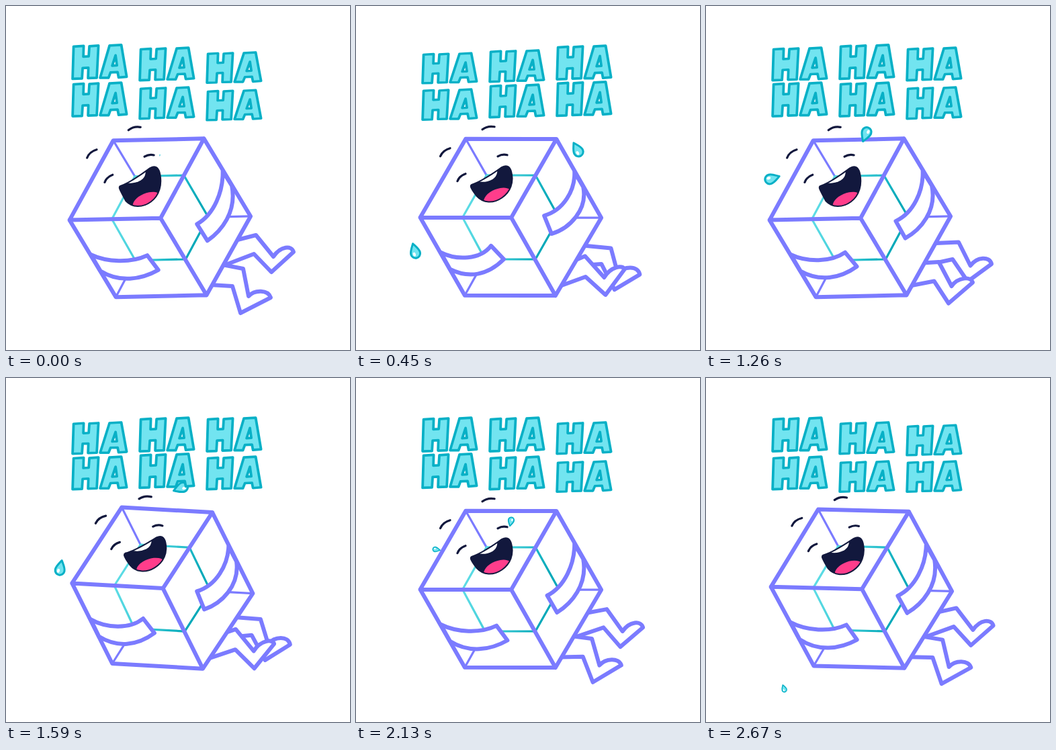
Write an HTML page that moves like this. It is 512 px wide and 512 px high and loops after 2.7 s.

```html
<!DOCTYPE html>
<html lang="en">
<head>
<meta charset="utf-8">
<title>Laughing cube</title>
<style>
  html, body { margin: 0; height: 100%; overflow: hidden; background: #fff; }
  svg { display: block; width: 100vw; height: 100vh; }
  path { stroke-linecap: round; stroke-linejoin: round; }
  .line { fill: none; stroke: #7b7bff; stroke-width: 6; }
  .limb { fill: #fff; stroke: #7b7bff; stroke-width: 6; }
  .thin { stroke-width: 3.2; }
  .ink { fill: none; stroke: #12183d; stroke-width: 3.2; }
  .core { fill: none; stroke: url(#teal); stroke-width: 3.2; }
  .water { fill: #72e4f0; stroke: #08b0c6; stroke-width: 3; }
  .letters { stroke-width: 3.8; }
</style>
</head>
<body>
<svg viewBox="0 0 512 512">
  <defs>
    <linearGradient id="teal" gradientUnits="userSpaceOnUse" x1="160" y1="300" x2="300" y2="330">
      <stop offset="0" stop-color="#5fdde6"/>
      <stop offset=".45" stop-color="#3ccbd6"/>
      <stop offset=".85" stop-color="#04a9b9"/>
    </linearGradient>
    <clipPath id="mouthClip"><path id="mouthEdge"/></clipPath>
    <path id="ha" class="water letters" fill-rule="evenodd" d="M101 60L116 59L115.500 75L123.500 74.500L124.500 59.500L138 58.500L135.500 106.500L122.500 107L123 91.500L114.500 92L113.500 107.500L99.500 108Z
      M154.500 58.500L172 57.500L180 105L168 106L166.500 98L156 98.500L153 106.500L140.500 106.500ZM158.500 88.500L165.500 88L163.500 73Z"/>
    <g id="drop">
      <path class="water" d="M0 -11C3 -6 7 -1 7 4A7 7 0 0 1 -7 4C-7 -1 -3 -6 0 -11Z"/>
      <ellipse cx="-2" cy="5" rx="2" ry="3" fill="#fff"/>
    </g>
  </defs>

  <path id="backLeg" class="limb"/>
  <path id="frontLeg" class="limb"/>
  <g id="body">
    <path fill="#fff" d="M163 198H298L365 315L297 431H162L95.500 315Z"/>
    <path class="line thin" d="M163 198L194 252M365 315H301M162 431L192 377"/>
    <path class="core" d="M194 252H267L302 315L267 377H192L158.500 315Z"/>
    <path class="line" d="M163 198H298L365 315L297 431H162L95.500 315ZM95.500 315H231L298 198M231 315L297 431"/>
    <path id="leftArm" class="limb"/>
    <path id="rightArm" class="limb"/>
    <path id="brows" class="ink" d="M151 261Q154 253 163 250M211 224Q218 220 225 222M125.500 224Q129 215 140 212M188 184Q196 178 206 180"/>
    <path id="mouth" fill="#12183d"/>
    <g clip-path="url(#mouthClip)">
      <path fill="#fff" d="M180 261L210 243Q211 253 203 258Q192 264 180 261Z"/>
      <ellipse id="tongue" rx="22" ry="12" fill="#ff3d8b"/>
    </g>
    <path id="lips" class="ink" style="stroke-width:2"/>
  </g>
  <use id="leftDrop" href="#drop"/>
  <use id="rightDrop" href="#drop"/>
  <g id="words" role="img" aria-label="HA HA HA HA HA HA"></g>
</svg>
<script>
const SVG = 'http://www.w3.org/2000/svg';
const STEP = 30, STEPS = 90, BEAT = 10, ROCK = 7;
const $ = id => document.getElementById(id);
const ease = u => (1 - Math.cos(Math.PI * u)) / 2;
const wave = k => ease(2 * k / BEAT);
const setPath = (id, d) => $(id).setAttribute('d', d);
const place = (el, transform) => el.setAttribute('transform', transform);

function make(tag, attrs) {
  const el = document.createElementNS(SVG, tag);
  for (const name in attrs) el.setAttribute(name, attrs[name]);
  return el;
}

// Each joint: x, y stretched out, then x, y pulled in.
const backLeg = [
  [333, 351, 330, 356], [372, 341, 380, 362], [398, 373, 389, 400],
  [409, 357, 398, 389], [425, 356, 419, 388], [428, 366, 422, 402],
  [395, 396, 384, 424], [369, 369, 365, 385], [322, 387, 322, 387]];
const frontLeg = [
  [322, 385, 322, 380], [353, 391, 340, 371], [361, 432, 370, 402],
  [370, 422, 380, 385], [390, 422, 398, 382], [394, 434, 400, 389],
  [349, 457, 373, 428], [337, 417, 342, 402], [304, 415, 298, 419]];

const flights = {
  leftDrop: make('path', { d: 'M127 257Q110 252 95 258C68 275 82 345 88 366S104 425 116 462' }),
  rightDrop: make('path', { d: 'M229 222Q231 207 239 188C252 150 295 150 329 213C340 233 357 262 368 284L381 314' })
};

const words = [];
for (let row = 0; row < 2; row++)
  for (let col = 0; col < 3; col++) {
    const el = $('words').appendChild(make('use', { href: '#ha' }));
    words.push({ el, x: col * 100 - .4, y: 108.4 + row * 55, lag: col * 2 + row });
  }

function drawLeg(id, joints, pull) {
  const p = joints.map(([x, y, x1, y1]) => `${x + (x1 - x) * pull} ${y + (y1 - y) * pull}`);
  setPath(id, `M${p[0]}L${p[1]}L${p[2]}C${p[3]} ${p[4]} ${p[5]}L${p[6]}L${p[7]}L${p[8]}`);
}

function drawArms(v) {
  setPath('leftArm', `M126 367C150 379 185 ${381 - 3 * v} ${210 - 9 * v} ${370 - 13 * v}
    L${226 - 6 * v} ${392 - 15 * v}C${200 - 4 * v} ${406 - 5 * v} 168 ${410 - 4 * v} 140 392Z`);
  setPath('rightArm', `M325 247C${325 + v} ${277 - 3 * v} ${311 - 2 * v} ${311 - 7 * v} ${285 - 5 * v} ${325 - 13 * v}
    L${300 - 9 * v} ${350 - 11 * v}C${321 - 3 * v} ${336 - 5 * v} 345 ${308 - 5 * v} 338 269Z`);
}

function drawFace(open) {
  const d = 5.5 * open;
  const shape = `M172 266C188 261 204 249 217 240C224 236 229 239 231 247
    C235 ${262 + d / 2} 230 ${276 + d} 217 ${285 + d}C204 ${294 + d} 189 ${293 + d} 180 ${283 + d}
    C176 ${278 + d / 2} 173 275 171 270Q170 267 172 266Z`;
  ['mouth', 'mouthEdge', 'lips'].forEach(id => setPath(id, shape));
  place($('tongue'), `translate(211 ${284 + d}) rotate(-22)`);
  place($('brows'), `translate(${-2 * open} ${-open})`);
}

function drawDrop(id, k, late) {
  const path = flights[id], length = path.getTotalLength();
  const at = length * ease(Math.min(1, k / 9));
  const a = path.getPointAtLength(Math.max(0, at - 1));
  const b = path.getPointAtLength(Math.min(length, at + 1));
  const p = path.getPointAtLength(at);
  const angle = Math.atan2(b.y - a.y, b.x - a.x) * 180 / Math.PI - 90;
  const size = Math.max(0, Math.min(1, (k + .2 - .2 * late) / 2, (9 - k + late) / 2));
  place($(id), `translate(${p.x} ${p.y}) rotate(${angle}) scale(${size})`);
}

function draw(step) {
  const k = step % BEAT, r = step % ROCK;

  const tilt = -1.2 + 5.2 * (r < 3 ? ease(r / 3) : ease((7 - r) / 4));
  place($('body'), `rotate(${tilt} 266 360)`);
  drawFace([1, .1, 0, 0, 0, .5, .95][r]);
  drawArms(wave(k));

  const pull = k < 4 ? ease(k / 4) : ease((10 - k) / 6);
  drawLeg('backLeg', backLeg, pull);
  drawLeg('frontLeg', frontLeg, pull);

  drawDrop('leftDrop', k, 1);
  drawDrop('rightDrop', k, 0);

  for (const { el, x, y, lag } of words) {
    const v = wave(k - lag);
    place(el, `translate(${x} ${y + 6.5 * v}) scale(1 ${1 - .115 * v}) translate(0 -108)`);
  }
}

let start;
function tick(now) {
  start ??= now;
  draw(Math.floor((now - start) / STEP) % STEPS);
  requestAnimationFrame(tick);
}
draw(0);
requestAnimationFrame(tick);
</script>
</body>
</html>
```
